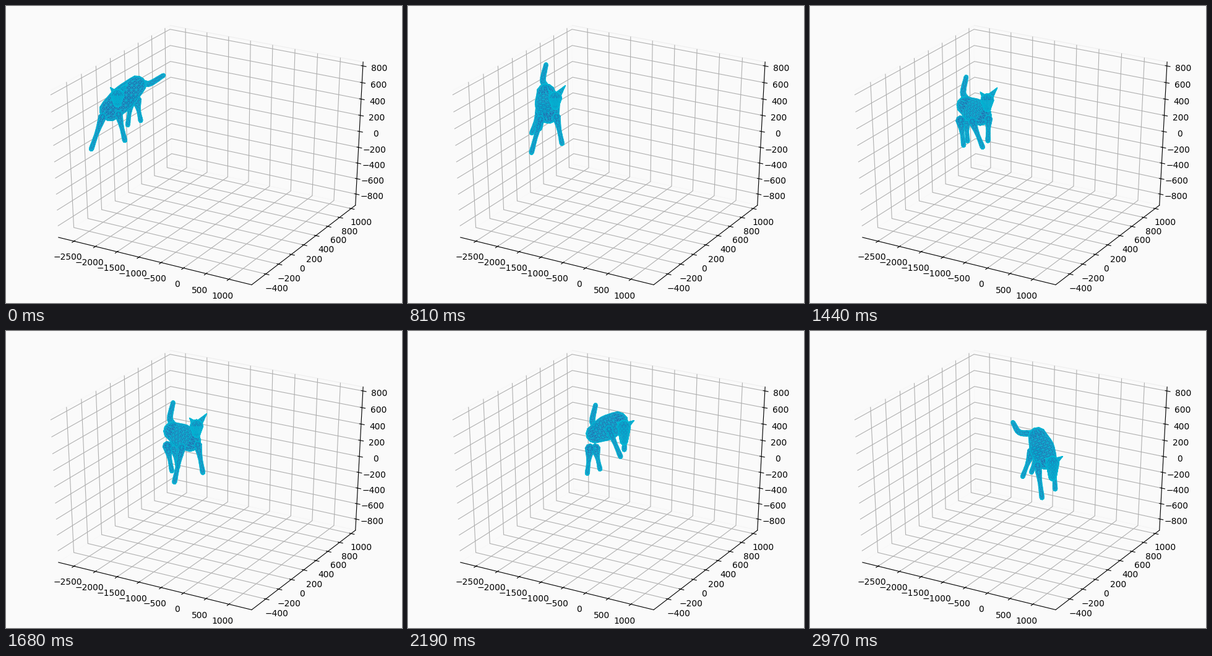
A matplotlib script that plays this animation: 640 by 480 pixels, repeating every 3000 ms.

```python
import numpy as np
import matplotlib.pyplot as plt
from matplotlib.animation import FuncAnimation
from matplotlib.collections import PolyCollection
from mpl_toolkits.mplot3d import Axes3D

FRAMES, STEP = 100, 30
BACK, FACE, EDGE = "#fafafa", "#1f77b4", "#00bcd8"
LIMITS = np.array([(-2778, 1405), (-580, 1042), (-911, 812)], float)
SPAN = np.ptp(LIMITS, axis=1)
MID = LIMITS.mean(axis=1)
DIST = 10


class WideAxes3D(Axes3D):
    """3D axes whose unit cube is stretched to the whole figure."""

    def apply_aspect(self, position=None):
        pass

    def get_proj(self):
        e, a = np.radians(30), np.radians(-60)
        right = np.array([-np.sin(a), np.cos(a), 0])
        toward = np.array([np.cos(e) * np.cos(a), np.cos(e) * np.sin(a), np.sin(e)])
        up = np.cross(toward, right)
        m = np.zeros((4, 4))
        for row, v in ((0, right), (1, up), (3, -toward)):
            m[row, :3] = v / SPAN
            m[row, 3] = -(v / SPAN) @ MID
        m[3, 3] += DIST
        m[2, 3] = -DIST
        return m


# Spine ends along the run, in stage pixels; all other joints follow from them
SECONDS = np.array([0, 0.81, 1.17, 1.68, 2.19, 2.49, 2.97])
RUMP = [(211, 128), (223, 141), (235, 157), (270, 162), (303, 166), (330, 142), (368, 171)]
CHEST = [(169, 168), (227, 172), (252, 170), (297, 177), (338, 148), (353, 187), (381, 206)]


def spline(keys, values, t):
    """Smooth curve through values at keys, sampled at t."""
    values = np.asarray(values, float)
    t = np.atleast_1d(t)
    slope = np.gradient(values, keys, axis=0)
    i = np.clip(np.searchsorted(keys, t, "right") - 1, 0, len(keys) - 2)
    h = (keys[i + 1] - keys[i])[:, None]
    s = (t - keys[i])[:, None] / h
    return ((1 + 2 * s) * (1 - s) ** 2 * values[i] + s * (1 - s) ** 2 * h * slope[i]
            + s * s * (3 - 2 * s) * values[i + 1] - s * s * (1 - s) * h * slope[i + 1])


def ease(t, start, end):
    s = np.clip((t - start) / (end - start), 0, 1)
    return s * s * (3 - 2 * s)


def wave(t, peak, period):
    return np.cos(2 * np.pi * (t - peak) / period)


def tube(joints, radii, rows, cols, cap=2):
    """Triangles covering the visible half of a round-ended tube."""
    points = np.column_stack([joints, radii])
    keys = np.arange(len(points), dtype=float)
    path = spline(keys, points, np.linspace(0, keys[-1], rows))
    axis = np.gradient(path[:, :2], axis=0)
    axis /= np.hypot(*axis.T)[:, None] + 1e-9

    a = np.linspace(np.pi / 2, 0, cap + 1)[:-1, None]

    def dome(end, direction):
        centre = path[end, :2] + direction * path[end, 2] * np.sin(a)
        return np.hstack([centre, path[end, 2] * np.cos(a)])

    path = np.vstack([dome(0, -axis[0]), path, dome(-1, axis[-1])[::-1]])
    axis = np.vstack([axis[:1]] * cap + [axis] + [axis[-1:]] * cap)
    normal = np.column_stack([-axis[:, 1], axis[:, 0]])
    side = np.cos(np.linspace(0, np.pi, cols + 1))
    grid = path[:, None, :2] + normal[:, None] * path[:, 2, None, None] * side[:, None]

    p, q, r, s = grid[:-1, :-1], grid[1:, :-1], grid[1:, 1:], grid[:-1, 1:]
    flip = (np.indices(p.shape[:2]).sum(axis=0) % 2 == 1)[..., None]
    one = np.stack([p, q, np.where(flip, s, r)], axis=2)
    two = np.stack([np.where(flip, q, p), r, s], axis=2)
    return np.concatenate([one.reshape(-1, 3, 2), two.reshape(-1, 3, 2)])


def leg(body, root, foot, radii):
    hip, paw = body + root, body + foot
    return tube([hip, (hip + paw) / 2, paw], radii, 10, 4)


def tail(rump, t):
    """Swings from trailing behind to upright, then over to the other side."""
    angle = np.radians(20 + 70 * ease(t, 0, 0.6) + 60 * ease(t, 2.19, 2.49))
    way = np.array([np.cos(angle), -np.sin(angle)])
    base, tip = rump + 11 * way, rump + 46 * way
    return tube([base, (base + tip) / 2 + (-5, 7), tip], (5, 4.6, 3.6), 11, 4)


def head(chest, t):
    """Held high until the leap, then lowered."""
    low = ease(t, 1.7, 2.19)
    crown = chest + (11, -23 + 30 * low)
    muzzle = crown + (0, 12 + 11 * low)
    ears = [crown + (-11, -13 + 6 * low), crown + (16, -20 + 10 * low)]
    parts = [tube([crown + 0.3 * (tip - crown), tip], (5.5, 0.5), 6, 4) for tip in ears]
    return parts + [tube([crown, muzzle], (11, 6.5), 9, 10, 3)]


def animal(t):
    rump, chest = (spline(SECONDS, track, t)[0] for track in (RUMP, CHEST))
    hind, fore = (8, 3.4, 3.8), (6.5, 3.5, 4)
    beat = wave(t, 0, 0.9)
    reach = 4 * t / 3
    return np.concatenate([
        tail(rump, t),
        leg(rump, (0, 24), (10 * wave(t, 1.92, 2.22), 57), hind),
        leg(rump, (-9, 24), (-14 + 12 * wave(t, 1.66, 2.22), 64), hind),
        tube([rump, (rump + chest) / 2, chest], (15.5, 20, 18), 11, 10, 3),
        leg(chest, (13, 7), (17 + 6 * beat, 43 + 6 * beat + 2 * reach), fore),
        leg(chest, (-13, 11), (-12 - 19 * beat, 54 + 9 * beat + 3 * reach), fore),
        *head(chest, t),
    ])


fig = plt.figure(figsize=(6.4, 4.8), dpi=100, facecolor=BACK)
ax = WideAxes3D(fig, [0, 0, 1, 1])
fig.add_axes(ax)
ax.set_facecolor("none")
ax.view_init(elev=30, azim=-60)
pad = SPAN / 48
low, high = LIMITS[:, 0] - pad, LIMITS[:, 1] + pad
ax.set(xlim=(low[0], high[0]), ylim=(low[1], high[1]), zlim=(low[2], high[2]))
ax.set_xticks(range(-2500, 1001, 500))
ax.set_yticks(range(-400, 1001, 200))
ax.set_zticks(range(-800, 801, 200))
ax.viewLim.intervalx = ax.viewLim.intervaly = (-0.95 / DIST, 0.9 / DIST)
for axis, rim in ((ax.xaxis, "#f7f7f7"), (ax.yaxis, "#f0f0f0"), (ax.zaxis, "#f7f7f7")):
    axis.set_pane_color(BACK)
    axis.pane.set_edgecolor(rim)

stage = fig.add_axes([0, 0, 1, 1], zorder=5)
stage.set_xlim(0, 640)
stage.set_ylim(480, 0)
stage.axis("off")
mesh = PolyCollection(animal(0), facecolor=FACE, edgecolor=EDGE, linewidth=0.35)
stage.add_collection(mesh, autolim=False)


def update(frame):
    mesh.set_verts(animal(frame * STEP / 1000))
    return (mesh,)


anim = FuncAnimation(fig, update, frames=FRAMES, interval=STEP,
                     repeat=True, repeat_delay=0)
plt.show()
```
